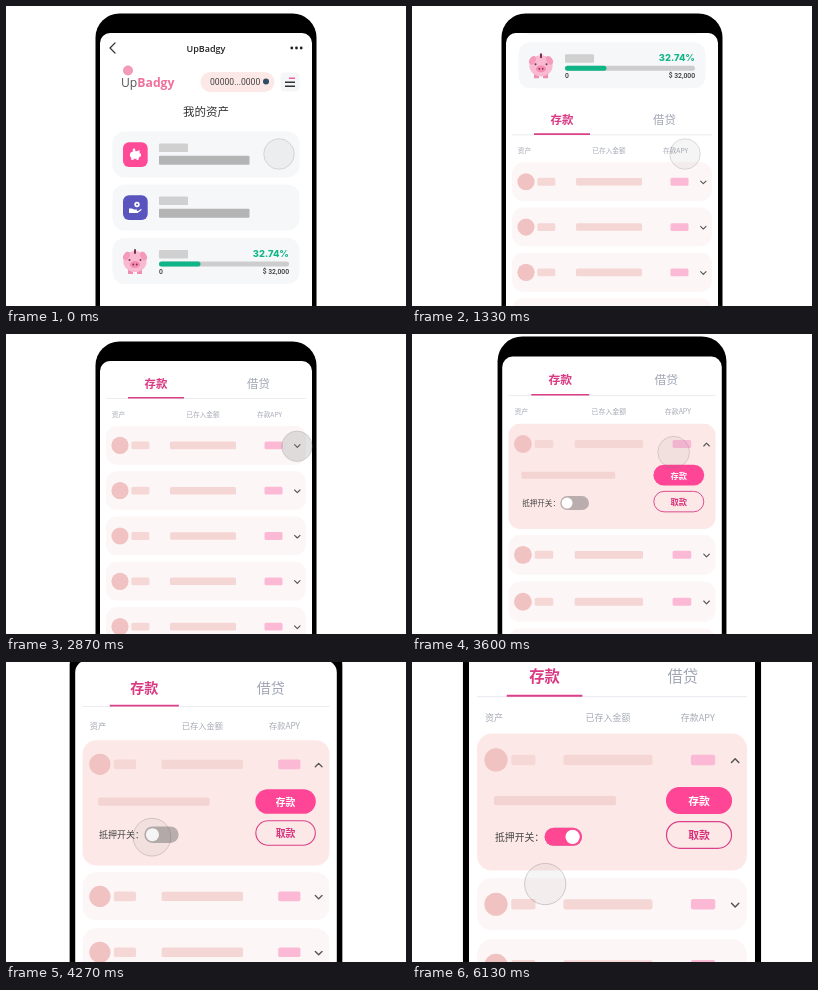
Recreate the animation shown at these times as an HTML page. Size 400 by 300 pixels, loop 6990 ms.

```html
<!DOCTYPE html>
<html lang="zh-CN">
<head>
<meta charset="utf-8">
<title>我的资产</title>
<style>
  html, body { margin: 0; height: 100%; overflow: hidden; background: #fff; }
  svg { display: block; width: 100vw; height: 100vh; }
  text { font-family: "Noto Sans CJK SC", "Noto Sans CJK", sans-serif; }
  .latin { font-family: Roboto, sans-serif; }
  .brand { font-family: "Open Sans", sans-serif; }
  .mid { text-anchor: middle; }
  .end { text-anchor: end; }
  .line { fill: none; stroke: #333; stroke-width: 1.2; stroke-linecap: round; stroke-linejoin: round; }
  .arrow { stroke: #555; stroke-width: 1.1; }
</style>
</head>
<body>
<svg viewBox="0 0 400 300">
  <defs>
    <clipPath id="screen"><rect x="94" y="27" width="212" height="400" rx="10"/></clipPath>
  </defs>
  <g id="world">
    <rect x="89.5" y="7.5" width="221" height="420" rx="24"/>
    <rect x="94" y="27" width="212" height="400" rx="10" fill="#fff"/>
    <g clip-path="url(#screen)">
      <g id="page">
        <!-- title bar -->
        <path class="line" d="M109 37l-5 5 5 5"/>
        <text class="brand mid" x="200" y="45.5" font-size="9" font-weight="600" fill="#222">UpBadgy</text>
        <g fill="#222"><circle cx="285.8" cy="42" r="1.4"/><circle cx="290.5" cy="42" r="1.4"/><circle cx="295.2" cy="42" r="1.4"/></g>

        <!-- site header -->
        <circle cx="122" cy="64.5" r="5" fill="#f29ab8"/>
        <text class="brand" x="115" y="81" font-size="12.2" fill="#555">Up<tspan font-weight="700" fill="#f0709c">Badgy</tspan></text>
        <rect x="194.5" y="66" width="74" height="20" rx="10" fill="#fce8e6"/>
        <text class="latin" x="204" y="79" font-size="8.6" fill="#444">00000...0000</text>
        <circle cx="260" cy="75.6" r="3" fill="#2f4d66"/>
        <rect x="274.5" y="66.5" width="19" height="19" rx="4" fill="#f5f6f8"/>
        <path d="M283 72.2h6" stroke="#f0609c" stroke-width="1.5"/>
        <path d="M279 76.2h10M279 80.2h10" stroke="#333" stroke-width="1.5"/>
        <text class="mid" x="200" y="110" font-size="11.5" fill="#333">我的资产</text>

        <!-- asset cards -->
        <g id="cards"></g>
        <g transform="translate(129 148.5)" fill="#fff">
          <ellipse rx="5.2" ry="3.9" cy=".5"/>
          <path d="M-4 2h2.5v3.5h-2zM1.5 2h2.5l-.5 3.5h-2zM1.5-3l3-1.5v3zM4-1h2v3h-2z"/>
          <circle cx="-1" cy="-4.6" r="1.3"/>
        </g>
        <g transform="translate(129 201.5)" fill="#fff">
          <circle cx="2" cy="-3" r="2.7"/>
          <path d="M-6 1h3l2 1h3q1 1-1 1.5h2l3-2q1.5 0 0 1.5l-3.5 2.5h-8.5z"/>
          <circle cx="2" cy="-3" r="1" fill="#5a54bf"/>
        </g>

        <!-- savings progress -->
        <g transform="translate(129 255.5)">
          <path d="M-7 8h5v4.5h-5zM2 8h5v4.5h-5z" fill="#ee8fb0"/>
          <ellipse rx="11.6" ry="10.6" fill="#f9b9cf"/>
          <g fill="#f69abb">
            <ellipse cx="-8.5" cy="-5.5" rx="3" ry="4.6" transform="rotate(30 -8.5 -5.5)"/>
            <ellipse cx="8.5" cy="-5.5" rx="3" ry="4.6" transform="rotate(-30 8.5 -5.5)"/>
          </g>
          <ellipse cy="3" rx="5" ry="3.4" fill="#f48cb2"/>
          <g fill="#7a3050">
            <circle cx="-5.5" cy="-1.5" r="1"/><circle cx="5.5" cy="-1.5" r="1"/>
            <circle cx="-1.7" cy="3" r=".9"/><circle cx="1.7" cy="3" r=".9"/>
            <rect x="-1" y="-12.5" width="2" height="5" rx="1"/>
          </g>
        </g>
        <text class="end" x="283" y="251" font-size="9.4" font-weight="800" fill="#10b587" style="font-family:Inter,sans-serif">32.74%</text>
        <rect x="153" y="255.5" width="130" height="5" rx="2.5" fill="#cdcdcd"/>
        <rect x="153" y="255.5" width="41.5" height="5" rx="2.5" fill="#10b587"/>
        <text class="latin" x="153" y="268" font-size="6.8" font-weight="500" fill="#333">0</text>
        <text class="latin end" x="283" y="268" font-size="6.8" font-weight="500" fill="#333">$ 32,000</text>

        <!-- tabs and table head -->
        <text class="mid" x="150" y="313.8" font-size="11.4" font-weight="700" fill="#d93a83">存款</text>
        <text class="mid" x="252.5" y="313.8" font-size="11.4" fill="#a0a5b5">借贷</text>
        <path d="M100 324.5h200" stroke="#ececf1"/>
        <path d="M122 323.8h56" stroke="#db3f87" stroke-width="1.6"/>
        <g font-size="6.7" fill="#a6aab5">
          <text x="105.8" y="342.6">资产</text>
          <text x="180.3" y="342.6">已存入金额</text>
          <text x="251" y="342.6">存款APY</text>
        </g>
        <g id="rows"></g>

        <!-- expanded part of the first row -->
        <g id="details">
          <rect x="112.5" y="398.2" width="90.5" height="6.8" rx="1.5" fill="#f4d4d2"/>
          <text x="113.3" y="431.2" font-size="7.3" font-weight="500" fill="#444">抵押开关：</text>
          <rect x="150" y="421.7" width="27.8" height="13.4" rx="6.7" fill="#b9adad"/>
          <rect id="toggleOn" x="150" y="421.7" width="27.8" height="13.4" rx="6.7" fill="#ff4794"/>
          <circle id="knob" cy="428.4" r="5.3" fill="#fff"/>
          <rect x="240" y="391.5" width="49" height="20" rx="10" fill="#ff4595"/>
          <text class="mid" x="264.5" y="404.9" font-size="8" font-weight="700" fill="#fff">存款</text>
          <rect x="240.4" y="417.1" width="48.2" height="19.8" rx="9.9" fill="none" stroke="#d9428a" stroke-width=".9"/>
          <text class="mid" x="264.5" y="430.2" font-size="8" font-weight="700" fill="#d6337c">取款</text>
        </g>
      </g>
    </g>
    <circle id="cursor" r="15.3" stroke="#777" stroke-opacity=".4" stroke-width=".6" fill="#777"/>
  </g>
</svg>
<script>
const LOOP = 6990, ROW_COUNT = 6, ROW_PITCH = 45.3, ROW_TOP = 351.9, EXPANSION = 61.7;
const $ = id => document.getElementById(id);
const set = (el, attrs) => { for (const name in attrs) el.setAttribute(name, attrs[name]); };
const mix = (a, b, k) => a + (b - a) * k;
const bar = (x, y, w, h, fill, rx = 1) =>
  `<rect x="${x}" y="${y}" width="${w}" height="${h}" rx="${rx}" fill="${fill}"/>`;

$('cards').innerHTML = [[125.5, '#ff4a98'], [178.5, '#5a54bf'], [232]].map(([y, icon]) =>
  bar(106.5, y, 187, 46, '#f6f7f9', 12) +
  bar(153, y + 12, 29, 8.4, '#d0d0d0') +
  (icon ? bar(117, y + 10.7, 24.7, 24.7, icon, 6) + bar(153, y + 24.3, 90.5, 9, '#b4b4b4') : '')
).join('');

$('rows').innerHTML = Array.from({ length: ROW_COUNT }, () =>
  `<g>${bar(100, 0, 200, 38.8, '#fdf6f6', 11)}
  <circle cx="114" cy="19.5" r="8.6" fill="#f0c2c1"/>
  ${bar(125.3, 15.6, 18, 7.8, '#f5d8d6', 1.5)}${bar(164, 15.7, 66, 7.6, '#f4d6d4', 1.5)}
  ${bar(258.5, 15.6, 18, 7.8, '#fbb9d6', 1.5)}
  <path class="line arrow" d="M-2.7-1.3L0 1.4 2.7-1.3"/></g>`).join('');
const rows = [...$('rows').children];

function bezier(x1, y1, x2, y2) {
  const at = (a, b, u) => 3 * a * u * (1 - u) ** 2 + 3 * b * u * u * (1 - u) + u ** 3;
  return x => {
    let lo = 0, hi = 1;
    for (let i = 0; i < 24; i++) {
      const u = (lo + hi) / 2;
      if (at(x1, x2, u) < x) lo = u; else hi = u;
    }
    return at(y1, y2, lo);
  };
}
const ease = bezier(.25, .1, .25, 1);
const inOut = p => p < .5 ? 2 * p * p : 1 - 2 * (1 - p) ** 2;
const span = (t, from, to, easing = inOut) =>
  easing(Math.min(1, Math.max(0, (t - from) / (to - from))));

function cursorAt(t) {
  const toArrow = span(t, 1750, 2480), toToggle = span(t, 3250, 4280), away = span(t, 4380, 5350);
  if (t < 3250) return [mix(273, 291, toArrow), mix(148, 112.3, toArrow)];
  if (t < 4380) {
    const curve = (a, b, c) => mix(mix(a, b, toToggle), mix(b, c, toToggle), toToggle);
    return [curve(291, 223, 156.2), curve(112.3, 123, 170.4)];
  }
  return [mix(156.2, 150.5, Math.sqrt(away)), mix(170.4, 203.4, away)];
}

function draw(t) {
  const zoom = mix(1, 1.349, span(t, 3190, 5010));
  set($('world'), { transform: `translate(200 150) scale(${zoom}) translate(-200 -150)` });
  set($('page'), { transform: `translate(0 ${-260 * span(t, 877, 1877, ease)})` });

  const open = span(t, 2900, 3500);
  rows.forEach((row, i) => {
    set(row, { transform: `translate(0 ${ROW_TOP + i * ROW_PITCH + (i ? open * EXPANSION : 0)})` });
    set(row.lastElementChild, { transform: `translate(291.3 20.1) scale(1 ${i ? 1 : 1 - 2 * open})` });
  });
  set(rows[0].firstElementChild, {
    height: 38.8 + open * (EXPANSION + 1),
    fill: `rgb(${mix(253, 252, open)},${mix(246, 232, open)},${mix(246, 230, open)})`
  });
  set($('details'), { opacity: span(t, 3150, 3500) });

  const on = span(t, 4530, 5530);
  set($('toggleOn'), { opacity: on });
  set($('knob'), { cx: mix(156.6, 170.8, on) });

  const [cx, cy] = cursorAt(t);
  const pressed = t >= 2860 && t < 3100;
  set($('cursor'), { cx, cy, 'fill-opacity': pressed ? .21 : .07 });
}

function frame() {
  draw(performance.now() % LOOP);
  requestAnimationFrame(frame);
}
frame();
</script>
</body>
</html>
```
